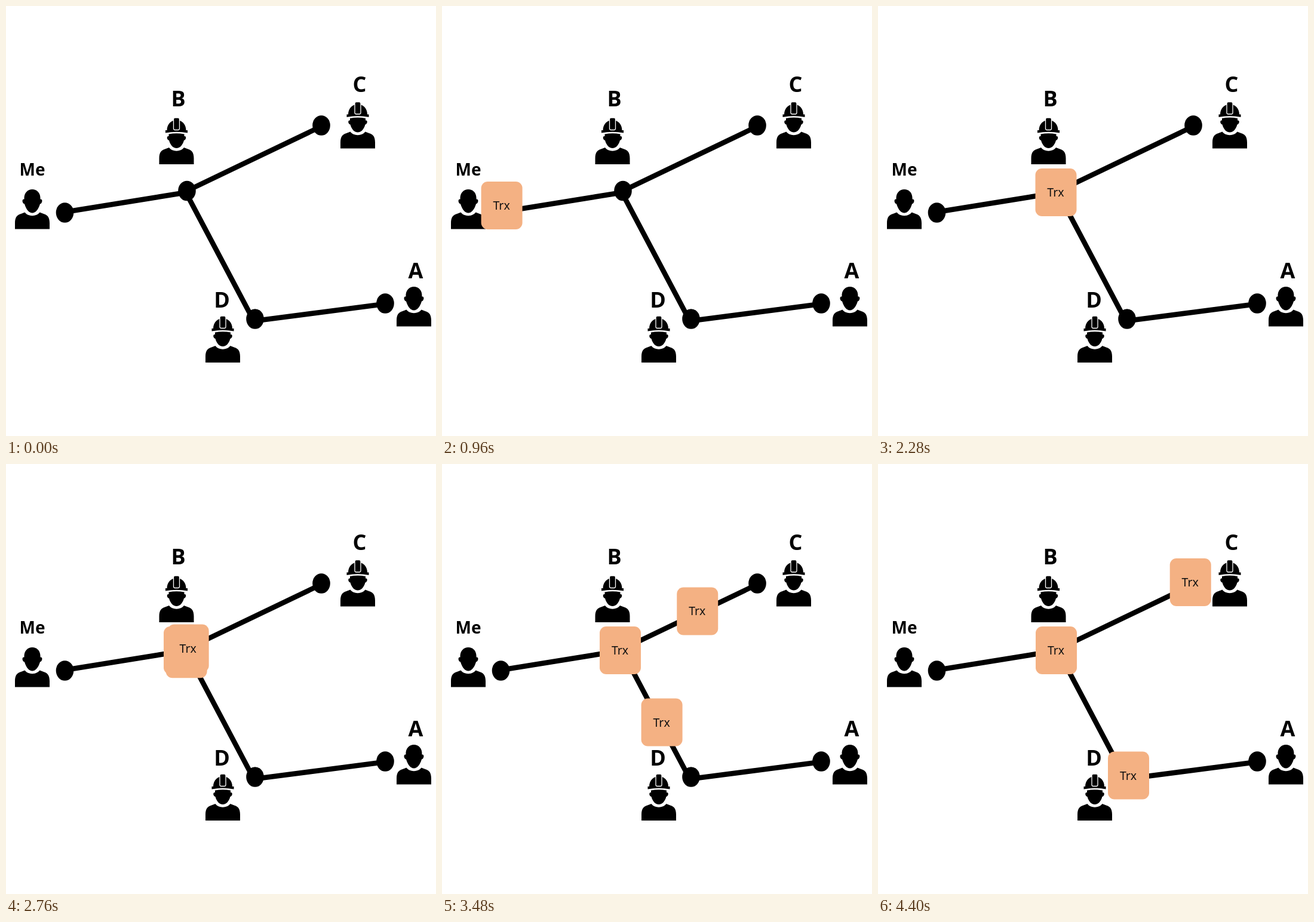
Recreate the animation shown at these times as an HTML page. Size 720 by 720 pixels, loop 4.44 s.

```html
<!DOCTYPE html>
<html lang="en">
<head>
<meta charset="utf-8">
<title>Transaction spreading through a network</title>
<style>
  html, body { margin: 0; width: 100%; height: 100%; overflow: hidden; background: #fff; }
  svg { display: block; width: 100%; height: 100%; }
  text { font-family: "Noto Sans", "Open Sans", sans-serif; text-anchor: middle; }
  .label { font-weight: 700; font-size: 36px; }
  .label.small { font-size: 28px; }
  .card rect { fill: #f4b183; }
  .card text { font-size: 19.5px; fill: #111; }
</style>
</head>
<body>
<svg viewBox="0 0 720 720">
  <defs>
    <path id="body" d="M-29 0V-10C-29 -20 -25 -24 -19 -25.500L-12.500 -28C-7 -20.500 7 -20.500 12.500 -28L19 -25.500C25 -24 29 -20 29 -10V0Z"/>
    <g id="person">
      <use href="#body"/>
      <path d="M-13.500 -50C-15 -72 15 -72 13.500 -50C18 -51 17 -43 13 -42C10 -32 5 -27 0 -27C-5 -27 -10 -32 -13 -42C-17 -43 -18 -51 -13.500 -50Z"/>
    </g>
    <g id="miner">
      <use href="#body"/>
      <path d="M-13 -50.500Q0 -53 13 -50.500V-47C17 -48 16.500 -41 12.500 -40C10 -31 5 -27 0 -27C-5 -27 -10 -31 -12.500 -40C-16.500 -41 -17 -48 -13 -47Z"/>
      <path d="M-18.500 -52.500V-57H-16C-16 -67 -9 -74 0 -74C9 -74 16 -67 16 -57H18.500V-52.500Q0 -56 -18.500 -52.500Z"/>
      <rect x="-5" y="-78" width="10" height="20.500" rx="2.500" stroke="#fff" stroke-width="1.300"/>
    </g>
  </defs>
  <rect width="720" height="720" fill="#fff"/>
  <g id="network"></g>
  <g id="cards"></g>
</svg>
<script>
const SVG_NS = "http://www.w3.org/2000/svg";
const LOOP = 4440, STEP = 40;
const network = document.getElementById("network");
const cardLayer = document.getElementById("cards");

function add(parent, tag, attrs, text) {
  const el = document.createElementNS(SVG_NS, tag);
  for (const key in attrs) el.setAttribute(key, attrs[key]);
  if (text) el.textContent = text;
  parent.appendChild(el);
  return el;
}

const links = [
  [98.5, 345, 303, 312],
  [303, 309.5, 526, 202.5],
  [300, 310, 410, 518],
  [430, 525.5, 630, 499.5]
];
for (const [x1, y1, x2, y2] of links)
  add(network, "line", { x1, y1, x2, y2, stroke: "#000", "stroke-width": 8.5 });

const nodes = [[98.5, 346], [303, 309.5], [528, 200], [417, 524], [635, 498]];
for (const [cx, cy] of nodes)
  add(network, "ellipse", { cx, cy, rx: 14.8, ry: 16.8 });

const people = [
  { icon: "person", x: 44, y: 373.5, name: "Me", at: [44, 284], size: "small" },
  { icon: "miner", x: 285.5, y: 265, name: "B", at: [288.5, 168] },
  { icon: "miner", x: 589, y: 238.5, name: "C", at: [592, 143.5] },
  { icon: "miner", x: 363, y: 597, name: "D", at: [361.5, 505] },
  { icon: "person", x: 683, y: 536.5, name: "A", at: [686, 455.5] }
];
for (const p of people) {
  add(network, "use", { href: "#" + p.icon, x: p.x, y: p.y });
  add(network, "text", { class: "label " + (p.size || ""), x: p.at[0], y: p.at[1] }, p.name);
}

function makeCard() {
  const card = add(cardLayer, "g", { class: "card" });
  add(card, "rect", { width: 69, height: 80, rx: 11 });
  add(card, "text", { x: 34, y: 47 }, "Trx");
  return card;
}

const clamp = v => Math.min(1, Math.max(0, v));
const progress = (t, start, duration) => clamp((t - start) / duration);
const easeInOut = s => s < 0.5 ? 2 * s * s : 1 - 2 * (1 - s) * (1 - s);

const START = [47, 296], HUB = [264, 272];
const mainCard = makeCard();
const copies = [[385, 481.5], [488.7, 158]].map(end => ({ end, card: makeCard() }));

function place(card, from, to, k) {
  const x = from[0] + (to[0] - from[0]) * k;
  const y = from[1] + (to[1] - from[1]) * k;
  card.setAttribute("transform", `translate(${x.toFixed(2)} ${y.toFixed(2)})`);
}

function render(t) {
  mainCard.setAttribute("opacity", progress(t, 0, 540));
  place(mainCard, START, HUB, easeInOut(progress(t, 600, 1740)));
  const spread = easeInOut(progress(t, 2550, 1725));
  for (const { card, end } of copies) {
    card.setAttribute("visibility", spread > 0 ? "visible" : "hidden");
    place(card, HUB, end, spread);
  }
}

let origin = null;
function tick(now) {
  if (origin === null) origin = now;
  const t = (now - origin) % LOOP;
  render(Math.floor(t / STEP) * STEP);
  requestAnimationFrame(tick);
}
render(0);
requestAnimationFrame(tick);
</script>
</body>
</html>
```
